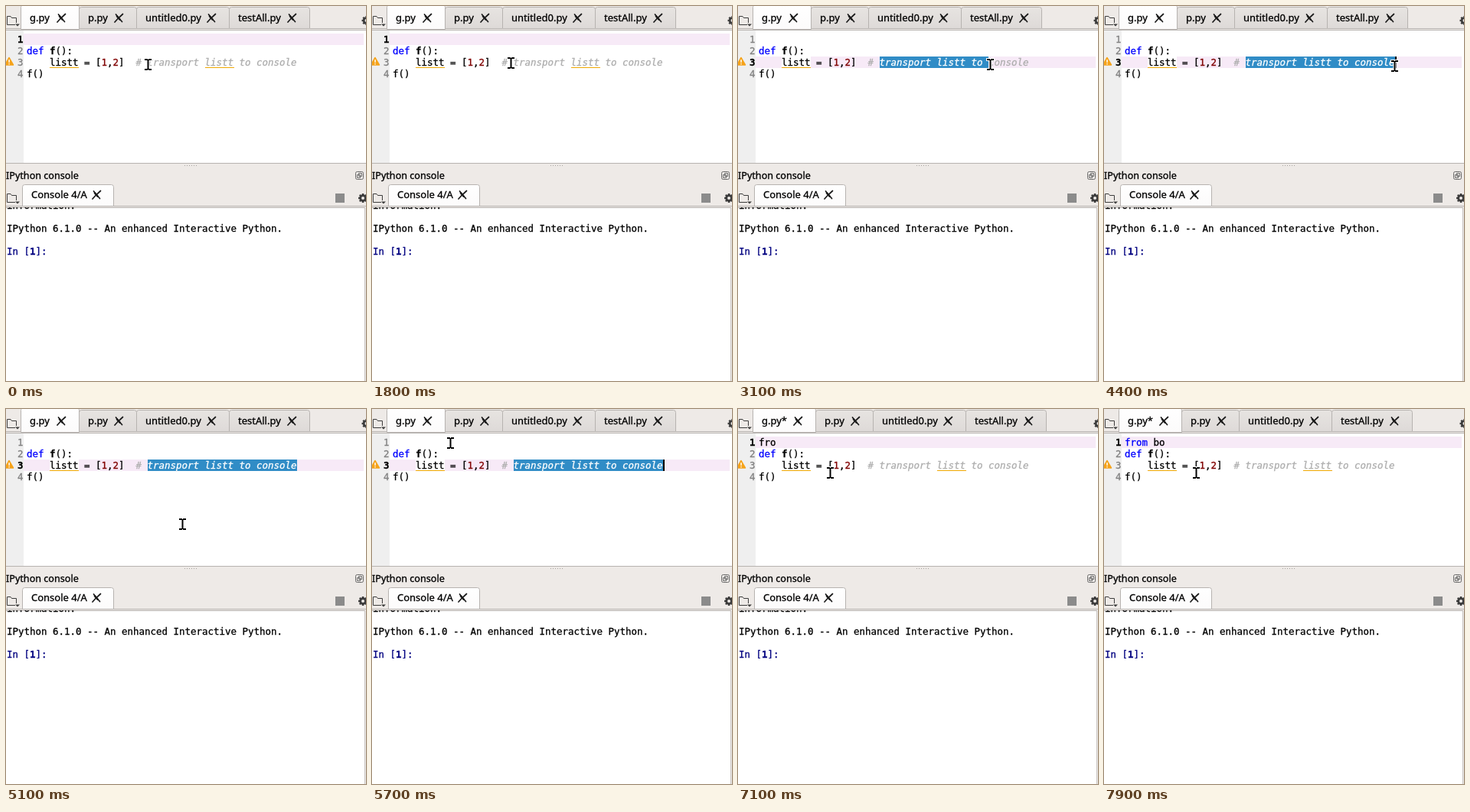
Recreate the animation shown at these times as an HTML page with a canvas. Size 470 by 490 pixels, loop 8000 ms.

```html
<!DOCTYPE html>
<html lang="en">
<head>
<meta charset="utf-8">
<title>Editor and console</title>
<style>
  html, body { margin: 0; width: 100%; height: 100%; overflow: hidden; background: #efebe8; }
  canvas { display: block; }
</style>
</head>
<body>
<canvas id="stage" width="470" height="490"></canvas>
<script>
const ctx = document.getElementById('stage').getContext('2d', { alpha: false });
const LOOP = 8000;
const COL = 7.5, ROW = 15, LEFT = 27, TOP = 36;
const MONO = '12.46px "DejaVu Sans Mono", monospace';
const UI = '"Noto Sans", sans-serif';
const PANEL = '#eeeae7', EDGE = '#b7b3b0', INK = '#3c3c3c';
const COMMENT_COL = 21;
const COMMENT = 'transport listt to console';

// Pointer keys: time, x, y
const PATH = [
  [0, 185.5, 76.5], [1200, 185.5, 76.5], [1400, 177.5, 74.5], [1700, 177.5, 74.5],
  [1900, 185.5, 73.5], [2200, 185.5, 73.5], [2400, 210.5, 80.5], [2500, 210.5, 80.5],
  [3100, 329.5, 76.5], [3400, 367.5, 80.5], [3500, 367.5, 80.5], [3900, 379.5, 78.5],
  [4500, 379.5, 78.5], [4700, 386.5, 104], [4900, 336, 174], [5100, 230, 150],
  [5400, 132.5, 80.5], [5700, 102.5, 44.5], [6100, 102.5, 44.5], [6200, 120.5, 83.5]
];
const KEYS = [6800, 7000, 7100, 7300, 7500, 7600, 7800];
const TYPED = 'from bo';

function pointer(t) {
  const i = PATH.findIndex(p => p[0] > t);
  if (i < 0) return PATH[PATH.length - 1].slice(1);
  const [t0, x0, y0] = PATH[i - 1], [t1, x1, y1] = PATH[i];
  const k = (t - t0) / (t1 - t0);
  return [x0 + (x1 - x0) * k, y0 + (y1 - y0) * k];
}

function rect(x, y, w, h, color) {
  ctx.fillStyle = color;
  ctx.fillRect(x, y, w, h);
}

// A hairline outline gives the text its firm screen weight
function text(s, x, y, color, font) {
  ctx.font = font;
  ctx.fillStyle = ctx.strokeStyle = color;
  ctx.lineWidth = 0.3;
  ctx.fillText(s, x, y);
  ctx.strokeText(s, x, y);
}

const colX = c => LEFT + c * COL;
const rowY = r => TOP + (r - 1) * ROW;

function code(s, col, row, color, style = '') {
  text(s, colX(col), rowY(row) + 12, color, style + ' ' + MONO);
}

function poly(points, color, width) {
  ctx.beginPath();
  points.forEach(([x, y]) => ctx.lineTo(x, y));
  ctx.strokeStyle = color;
  ctx.lineWidth = width;
  ctx.stroke();
}

function closeIcon(x, y) {
  ctx.lineCap = 'round';
  poly([[x - 5, y + 5.5], [x - 0.5, y + 0.5], [x + 5.5, y - 5]], '#1a1a1a', 1.7);
  poly([[x - 3.5, y - 4.5], [x, y], [x + 4.5, y + 5]], '#1a1a1a', 1.7);
  poly([[x - 2, y - 2], [x + 1.5, y + 2]], '#1a1a1a', 2.6);
  ctx.lineCap = 'butt';
}

function tab(x, y, w, h, label, active, closeX) {
  const fill = ctx.createLinearGradient(0, y, 0, y + h);
  fill.addColorStop(0, active ? '#ffffff' : '#e7e4e1');
  fill.addColorStop(1, active ? '#fcfbfb' : '#dedad8');
  ctx.beginPath();
  ctx.roundRect(x + 0.5, y + 0.5, w, h, [3, 3, 0, 0]);
  ctx.fillStyle = fill;
  ctx.fill();
  ctx.strokeStyle = EDGE;
  ctx.lineWidth = 1;
  ctx.stroke();
  const base = y < 100 ? 20 : 251;
  text(label, x + 12, base, '#000', '13px ' + UI);
  closeIcon(closeX, base - 4.5);
}

function folderIcon(y) {
  poly([[12, y + 11.5], [1.5, y + 11.5], [1.5, y + 0.5], [6, y + 0.5], [7.5, y + 2.5],
    [13.5, y + 2.5], [13.5, y + 9]], INK, 1);
  ctx.beginPath();
  ctx.moveTo(12, y + 10.5);
  ctx.lineTo(18, y + 10.5);
  ctx.lineTo(15, y + 13.5);
  ctx.fillStyle = INK;
  ctx.fill();
}

function gear(x, y) {
  for (let i = 0; i < 8; i++) {
    const a = i * Math.PI / 4, c = Math.cos(a), s = Math.sin(a);
    poly([[x + 3 * c, y + 3 * s], [x + 6 * c, y + 6 * s]], INK, 2.4);
  }
  ctx.beginPath();
  ctx.arc(x, y, 3.4, 0, 7);
  ctx.lineWidth = 2.8;
  ctx.stroke();
}

function warning() {
  ctx.beginPath();
  ctx.moveTo(4, 67.5);
  ctx.lineTo(9.5, 77);
  ctx.lineTo(-1.5, 77);
  ctx.closePath();
  ctx.fillStyle = ctx.strokeStyle = '#f5a31a';
  ctx.lineWidth = 1.5;
  ctx.lineJoin = 'round';
  ctx.fill();
  ctx.stroke();
  ctx.lineJoin = 'miter';
  rect(3.4, 70, 1.4, 4, '#fff');
  rect(3.4, 75, 1.4, 1.4, '#fff');
}

function editorTabs(edited) {
  const shift = edited ? 6 : 0;
  rect(0, 0, 470, 31, PANEL);
  rect(0, 29, 470, 1, EDGE);
  folderIcon(13);
  tab(95 + shift, 1, 75, 28, 'p.py', false, 147 + shift);
  tab(170 + shift, 1, 121, 28, 'untitled0.py', false, 268 + shift);
  tab(291 + shift, 1, 105, 28, 'testAll.py', false, 373 + shift);
  tab(19, -2, 76 + shift, 32, edited ? 'g.py*' : 'g.py', true, 72 + shift);
  gear(470.5, 19);
}

function editor(t) {
  const current = t >= 2200 && t < 5900 ? 3 : 1;
  const [px] = pointer(t);
  const typed = KEYS.filter(k => t >= k).length;
  let selected = 0;
  if (current === 3) {
    const reach = t < 3900 ? Math.round((px - colX(COMMENT_COL)) / COL) : COMMENT.length;
    selected = Math.max(0, Math.min(COMMENT.length, reach));
  }

  rect(0, 31, 470, 1, EDGE);
  rect(0, 32, 470, 173, '#fff');
  rect(0, 32, 23, 173, '#efefef');
  rect(23, rowY(current), 444, ROW, '#f7eaf7');
  for (let n = 1; n <= 4; n++) {
    const on = n === current;
    text(n, 15, rowY(n) + 12, on ? '#000' : '#808080', (on ? 'bold ' : '') + MONO);
  }
  warning();

  // Flagged words keep a plain background and a warning underline
  for (const x of [57, 260]) {
    rect(x, rowY(3), 38, ROW, '#fff');
    rect(x, 80, 38, 1, '#f0a800');
  }

  code(TYPED.slice(0, Math.min(typed, 4)), 0, 1, typed >= 4 ? '#0000ff' : '#000');
  code(TYPED.slice(5, Math.max(typed, 5)), 5, 1, '#000');
  code('def', 0, 2, '#0000ff');
  code('f', 4, 2, '#000', 'bold');
  code('():', 5, 2, '#000');
  code('listt = [', 4, 3, '#000');
  code('1', 13, 3, '#800000');
  code(',', 14, 3, '#000');
  code('2', 15, 3, '#800000');
  code(']', 16, 3, '#000');
  code('# ' + COMMENT, 19, 3, '#adadad', 'italic');
  code('f()', 0, 4, '#000');

  if (selected) {
    const x = Math.round(colX(COMMENT_COL));
    ctx.save();
    ctx.beginPath();
    ctx.rect(x, rowY(3), Math.round(colX(COMMENT_COL + selected)) - x, ROW);
    ctx.clip();
    rect(x, rowY(3), 200, ROW, '#308cc6');
    code(COMMENT, COMMENT_COL, 3, '#fff', 'italic');
    ctx.restore();
  }

  const blink = Math.floor((t - 4400) / 500) % 2 === 0;
  if (t >= 2200 && blink) {
    const col = current === 3 ? COMMENT_COL + selected : typed;
    rect(Math.round(colX(col)), rowY(current), 2, ROW, '#000');
  }
}

function consolePane() {
  rect(0, 205, 470, 285, PANEL);
  rect(0, 205, 470, 1, EDGE);
  for (let x = 233; x < 250; x += 3) rect(x, 208, 1, 1, '#a5a19e');
  text('IPython console', 0, 226, '#000', '12.6px ' + UI);

  ctx.strokeStyle = '#6a6a6a';
  ctx.lineWidth = 1;
  ctx.beginPath();
  ctx.roundRect(456.5, 216.5, 10, 10, 2);
  ctx.rect(460.5, 218.5, 4, 4);
  ctx.rect(458.5, 220.5, 4, 4);
  ctx.stroke();

  rect(0, 261, 470, 1, EDGE);
  folderIcon(245);
  tab(21, 233, 119, 28, 'Console 4/A', true, 118);
  rect(430, 245, 12, 12, '#8b8b8b');
  gear(466, 251);

  rect(0, 263, 468, 227, '#fff');
  rect(0, 263, 469, 1, EDGE);
  rect(468, 263, 1, 227, '#c4c0bd');
  ctx.save();
  ctx.beginPath();
  ctx.rect(0, 263, 468, 227);
  ctx.clip();
  text('information.', 1, 265, '#000', MONO);
  text('IPython 6.1.0 -- An enhanced Interactive Python.', 1, 295, '#000', MONO);
  text('In [', 1, 325, '#000080', MONO);
  text('1', 31, 325, '#000080', 'bold ' + MONO);
  text(']:', 38.5, 325, '#000080', MONO);
  ctx.restore();
}

function beam([px, py]) {
  const x = Math.round(px - 4.5), y = Math.round(py - 7.5);
  const parts = [[0, 0, 4, 2], [5, 0, 4, 2], [3.5, 1, 2, 13], [0, 13, 4, 2], [5, 13, 4, 2]];
  for (const [dx, dy, w, h] of parts) rect(x + dx - 1, y + dy - 1, w + 2, h + 2, '#fff');
  for (const [dx, dy, w, h] of parts) rect(x + dx, y + dy, w, h, '#000');
}

function draw(now) {
  const t = Math.floor((now % LOOP) / 100) * 100;
  editorTabs(t >= 6800);
  editor(t);
  consolePane();
  beam(pointer(t));
}

const start = performance.now();
function tick() {
  draw(performance.now() - start);
  requestAnimationFrame(tick);
}
tick();
</script>
</body>
</html>
```
